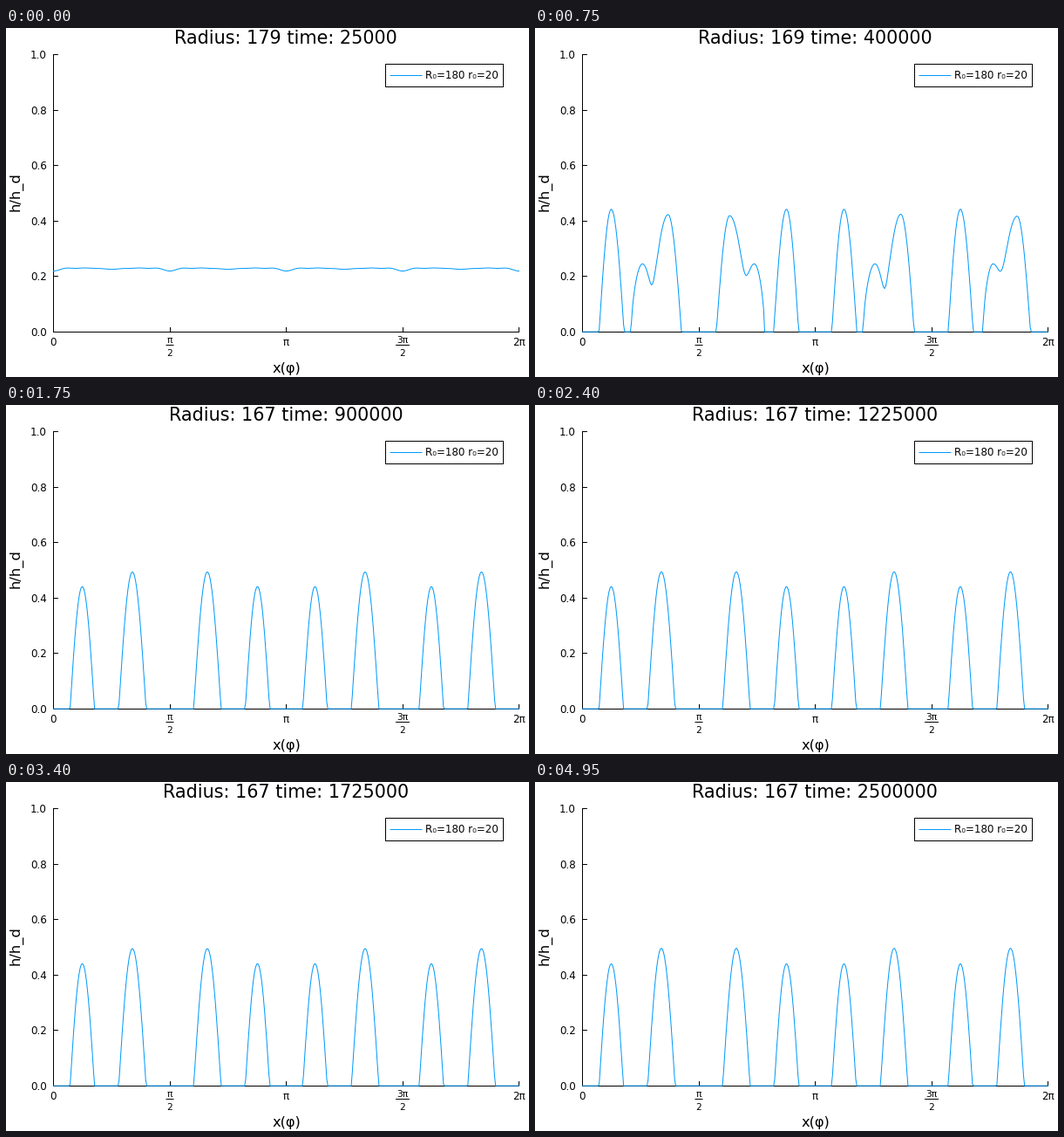
These frames come from a looping animation (600x400 px, 5 s). A matplotlib script:

```python
import numpy as np
import matplotlib.pyplot as plt
from matplotlib.animation import FuncAnimation
from matplotlib.patches import Rectangle

W, H, DPI = 600, 400, 100
PX = 72 / DPI                       # points per pixel
LEFT, RIGHT, TOP, BASE = 54.5, 588.5, 30.5, 348.5
QUARTER = (RIGHT - LEFT) / 4
BLUE = "#009AFA"
FRAMES, INTERVAL = 100, 50
RUPTURE, DROPS, SETTLED = 11, 15, 21   # stages of the break-up
FLOOR = 0.001
JOIN = 3                               # softness of the valley between drops

# Each quarter holds one lone drop and one merging pair; one quarter is
# mirrored, and the pairs differ only in how far their merging has come.
SIDES = (1, -1, 1, 1)
LEADS = (0.2, 0.75, 0, 1)
GROWING = {1: -0.02, 2: -0.07, 3: -0.05}   # film modes at rupture

x = np.linspace(LEFT, RIGHT, 420)


def smooth(t):
    t = np.clip(t, 0, 1)
    return t * t * (3 - 2 * t)


def mix(a, b, t):
    return a + (b - a) * t


def film(n):
    u = 2 * np.pi * (x - LEFT) / QUARTER
    h = np.full_like(x, 0.2285)
    for k in range(1, 7):
        early = -0.001 if k % 2 else -0.006 / k
        late = GROWING.get(k, early)
        h += early * (late / early) ** (n / RUPTURE) * np.cos(k * u)
    return h


def cap(d, height, left, right, left_power=1.0, right_power=1.0):
    """Cosine cap over the distance d from its peak, with uneven flanks."""
    u = np.clip(np.where(d < 0, d / left, d / right), -1, 1)
    power = np.where(d < 0, left_power, right_power)
    return height * np.clip(np.cos(np.pi / 2 * u), 0, 1) ** power


def reach(distance, level, power):
    """Half width at which a cap falls to the given level."""
    return np.pi / 2 * distance / np.arccos(level ** (1 / power))


def pair(s, lead, t, drift):
    edge, small, valley, main, end = 55 + 4 * lead, 68.5 + 2 * lead, 79.5, 98.2, 113.5
    small_h, main_h = 0.246, 0.425 - 0.007 * lead
    merged, merged_h, half = 90.5, 0.494 + 0.003 * drift, 15.7
    flank = (0.157 + 0.063 * lead) / 2 ** (1 / JOIN)

    small_cap = cap(s - mix(small, merged, t), mix(small_h, 0, t),
                    mix(small - edge, half, t),
                    mix(reach(valley - small, flank / small_h, 1), half, t),
                    left_power=mix(0.6, 1, t))
    main_cap = cap(s - mix(main, merged, t), mix(main_h, merged_h, t),
                   mix(reach(main - valley, flank / main_h, 2), half, t),
                   mix(end - main, half, t),
                   left_power=mix(2, 1, t))
    return (small_cap ** JOIN + main_cap ** JOIN) ** (1 / JOIN)


def drops(n):
    t = smooth((n - DROPS) / (SETTLED - DROPS))
    drift = max(0, n - SETTLED) / (FRAMES - SETTLED)
    h = np.zeros_like(x)
    for i, (side, lead) in enumerate(zip(SIDES, LEADS)):
        start = LEFT + QUARTER * (i if side > 0 else i + 1)
        s = side * (x - start)
        h += cap(s - 33, 0.443 - 0.001 * (t + drift), 14, mix(14.7, 14, t))
        h += pair(s, lead, t, drift)
    return h


def height(n):
    t = np.clip((n - RUPTURE) / (DROPS - RUPTURE), 0, 1)
    return np.maximum(mix(film(min(n, DROPS)), drops(n), t), FLOOR)


def to_y(h):
    return BASE - (BASE - TOP) * h


def crisp(v):
    return np.floor(v) + 0.5


fig = plt.figure(figsize=(W / DPI, H / DPI), dpi=DPI, facecolor="white")
ax = fig.add_axes([0, 0, 1, 1])
ax.set_xlim(0, W)
ax.set_ylim(H, 0)
ax.axis("off")


def line(xs, ys, color="black", **kw):
    return ax.plot(xs, ys, color=color, lw=PX, snap=False, **kw)[0]


def text(px, py, s, size, ha="center", **kw):
    return ax.text(px, py, s, fontsize=size * PX, family="DejaVu Sans",
                   color="black", ha=ha, va="baseline", **kw)


def fraction(px, top, bottom, half):
    text(px, 361, top, 10.6)
    line([px - half, px + half], [363.5, 363.5])
    text(px, 375.5, bottom, 10.6)


# axes
line([LEFT, LEFT], [TOP, BASE])
line([LEFT, RIGHT], [BASE, BASE])
for v in np.linspace(0, 1, 6):
    y = crisp(to_y(v))
    line([LEFT, LEFT + 5], [y, y])
    text(46.8, y + 4.3, f"{v:.1f}", 11.9, ha="right")
for i in range(5):
    px = crisp(LEFT + i * QUARTER)
    line([px, px], [BASE, BASE - 5])
for i, label in ((0, "0"), (2, "π"), (4, "2π")):
    text(LEFT + i * QUARTER - 0.5, 364, label, 11.9)
fraction(LEFT + QUARTER, "π", "2", 4)
fraction(LEFT + 3 * QUARTER, "3π", "2", 7.5)
text(322, 395, "x(φ)", 16.3)
text(15.3, 188, "h/h_d", 16.3, rotation=90, rotation_mode="anchor")

curve = line(x, to_y(height(0)), BLUE, zorder=3)

# legend
ax.add_patch(Rectangle((435.5, 41.5), 135, 26, fc="white", ec="black",
                       lw=PX, snap=False, zorder=4))
line([441, 477], [54.5, 54.5], BLUE, zorder=5)
text(481, 58.5, "R₀=180 r₀=20", 11.9, ha="left", zorder=5)

title = text(321.2, 18.3, "", 20.8)


def update(n):
    radius = max(167, 179 - round(n * 10 / DROPS))
    title.set_text(f"Radius: {radius} time: {25000 * (n + 1)}")
    curve.set_ydata(to_y(height(n)))
    return title, curve


anim = FuncAnimation(fig, update, frames=FRAMES, interval=INTERVAL,
                     repeat=True, repeat_delay=0, blit=False)
plt.show()
```
